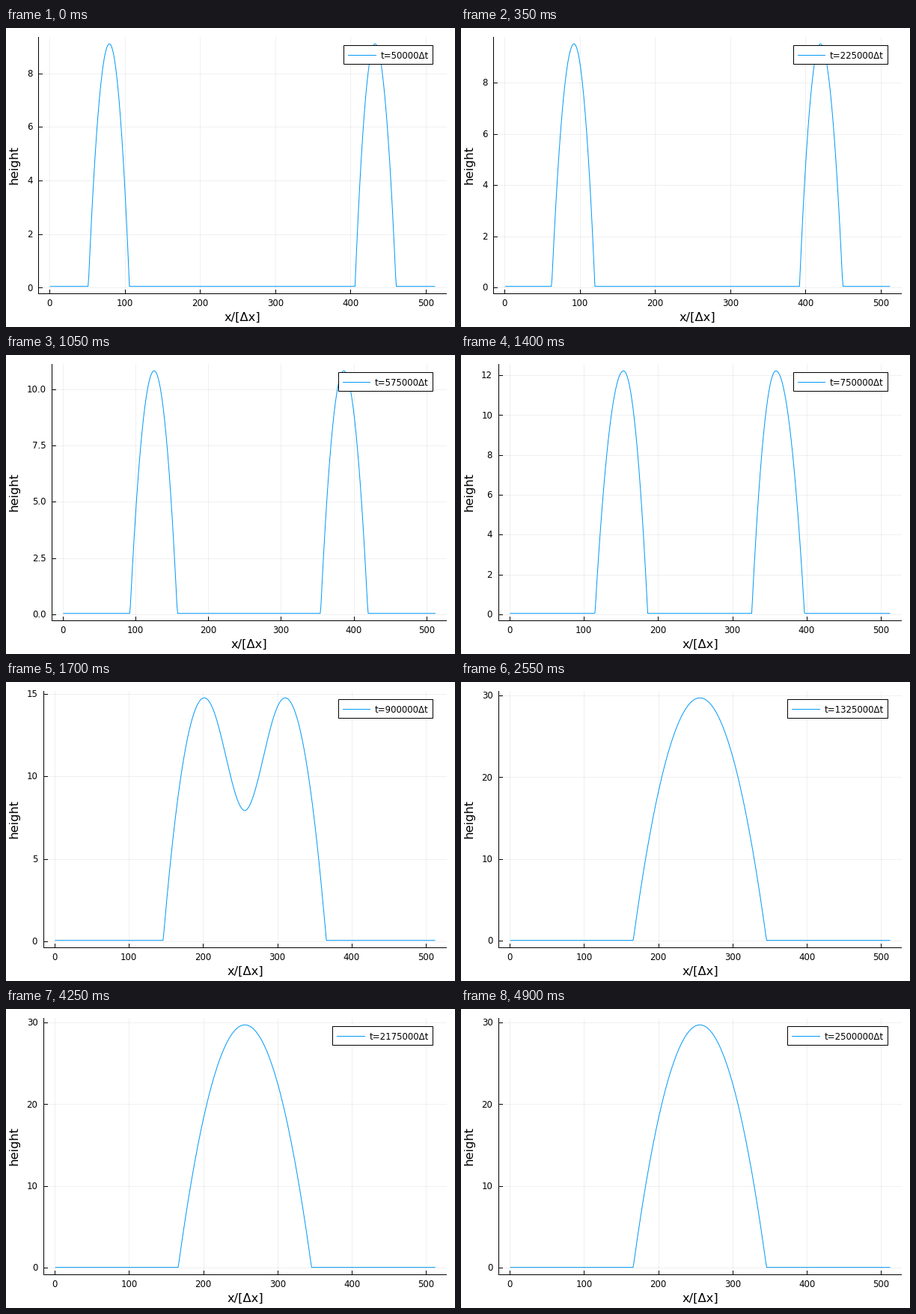
Animation of 600 by 400 pixels, one loop 4950 ms. Source, as a matplotlib script:

```python
import numpy as np
import matplotlib.pyplot as plt
from matplotlib.animation import FuncAnimation
from matplotlib.patches import Rectangle

W, H, DPI = 600, 400, 100
FRAMES, INTERVAL = 99, 50
PX = 72 / DPI
TOP, BOTTOM, RIGHT = 11.5, 355.4, 588.3
BLUE = "#009AF9"
FILM = 0.05          # height of the flat film
CENTRE = 256
MERGED = 34          # step at which the ring has closed
R_END, H_END = 89.8, 29.66

plt.rcParams["font.family"] = "DejaVu Sans"
fig = plt.figure(figsize=(W / DPI, H / DPI), dpi=DPI, facecolor="white")
ax = fig.add_axes([0, 0, 1, 1])

x = np.arange(1, 513)
r = np.abs(x - CENTRE)


def power_path(k, power, values):
    """Interpolate so that value**power changes linearly with time."""
    steps = [0, 13, 21, 33]
    return np.interp(k, steps, np.power(values, power)) ** (1 / power)


def ring(k):
    """Cross-section of the shrinking ring."""
    inner = power_path(k, 2.4, [150.0, 122.2, 98.5, 26.0])
    peak = power_path(k, 2.8, [176.6, 151.2, 130.4, 68.0])
    outer = power_path(k, 3.5, [204.6, 182.6, 163.6, 116.6])
    height = power_path(k, -5.0, [9.05, 9.92, 10.76, 14.68])
    half = np.where(r < peak, peak - inner, outer - peak)
    return height * np.clip(1 - ((r - peak) / half) ** 2, 0, None)


def drop(k):
    """Dimpled drop that relaxes to a parabolic cap of equal volume."""
    m = k - MERGED
    radius = R_END + 20 * np.exp(-0.68 * m)
    dimple = np.exp(-0.75 * m)
    u = r / radius
    crest = 0.496
    inside = 11.3 - 3.42 * np.cos(np.pi * (u / crest) ** 0.94)
    outside = 14.72 * (1 - ((u - crest) / (1 - crest)) ** 2)
    dimpled = np.where(u < crest, inside, outside) * (109.8 / radius) ** 2
    cap = H_END * (R_END / radius) ** 2 * (1 - u ** 2)
    return np.where(u < 1, dimple * dimpled + (1 - dimple) * cap, 0)


def tick_step(top):
    for limit, step in ((10, 2), (12.5, 2.5), (14, 2), (15, 2.5), (30, 5)):
        if top < limit:
            return step
    return 10


def left_edge(top, step):
    if step == 2.5:
        return 62
    if top < 10:
        return 44
    return 50.7 if top < 20 else 51.1


def line(xs, ys, color="black", **kw):
    ax.plot(xs, ys, color=color, lw=PX, **kw)


def label(px, py, s, size=11.8, **kw):
    return ax.text(px, py, s, fontsize=size * PX, va="baseline", **kw)


def legend(s):
    text = label(564.6, 41, s, ha="right", zorder=6)
    left = 564.6 - text.get_window_extent().width - 49
    ax.add_patch(Rectangle((left, 23), 570 - left, 25.2, fc="white",
                           ec="black", lw=PX, zorder=4))
    line([left + 6, left + 42.5], [35.9, 35.9], BLUE, zorder=5)


def draw(k):
    ax.clear()
    ax.set_xlim(0, W)
    ax.set_ylim(H, 0)
    ax.axis("off")

    h = FILM + (ring(k) if k < MERGED else drop(k))
    pad = 0.03 * (h.max() - FILM)
    low, high = FILM - pad, h.max() + pad
    step = tick_step(high)
    left = left_edge(high, step)
    spine = left - 0.65

    def to_x(v):
        return left + (v + 14.33) / 541.66 * (RIGHT - left)

    def to_y(v):
        return BOTTOM - (v - low) / (high - low) * (BOTTOM - TOP)

    grid = dict(alpha=0.06, zorder=1)
    for v in range(0, 501, 100):
        px = to_x(v)
        line([px, px], [TOP, BOTTOM], **grid)
        line([px, px], [BOTTOM, BOTTOM - 5], zorder=2)
        label(px, 372, str(v), ha="center")
    for v in np.arange(0, high, step):
        py = to_y(v)
        line([spine, RIGHT], [py, py], **grid)
        line([spine, spine + 5], [py, py], zorder=2)
        text = f"{v:.1f}" if step == 2.5 else f"{v:.0f}"
        label(left - 8.6, py + 4.1, text, ha="right")

    line([spine, spine], [TOP, BOTTOM], zorder=2)
    line([spine, RIGHT], [BOTTOM, BOTTOM], zorder=2)
    line(to_x(x), to_y(h), BLUE, zorder=3)

    label((left + RIGHT) / 2, 392, "x/[Δx]", 16.2, ha="center")
    label(16, (TOP + BOTTOM) / 2, "height", 16.2, ha="center",
          rotation=90, rotation_mode="anchor")
    legend(f"t={50000 + 25000 * k}Δt")
    return []


anim = FuncAnimation(fig, draw, frames=FRAMES, interval=INTERVAL,
                     init_func=lambda: [], repeat=True, repeat_delay=0)
plt.show()
```
